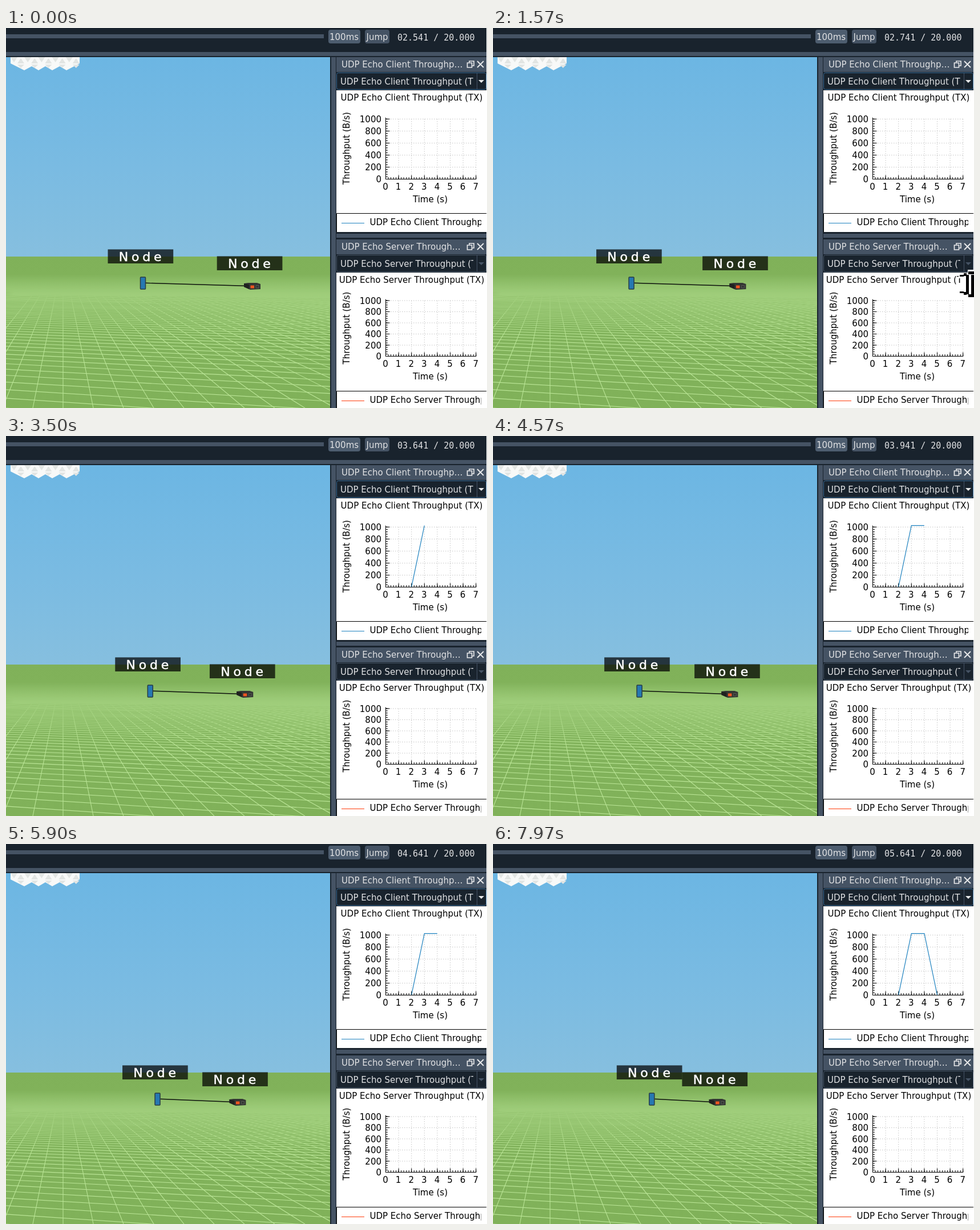
Recreate the animation shown at these times as an HTML page. Size 843 by 665 pixels, loop 8000 ms.

```html
<!DOCTYPE html>
<html lang="en">
<head>
<meta charset="utf-8">
<title>Network simulation playback</title>
<style>
  html, body { margin: 0; width: 100%; height: 100%; overflow: hidden; background: #19232d; }
  svg { display: block; }
  text { font: 15px "DejaVu Sans", sans-serif; white-space: pre; }
  .ui { fill: #e0e1e3; }
  .clock { font-family: "DejaVu Sans Mono", monospace; }
  .label { font-size: 22px; letter-spacing: 5.8px; fill: #fff; stroke: #fff; stroke-width: .5px; }
  .mid { text-anchor: middle; }
  .end { text-anchor: end; }
  rect { shape-rendering: crispEdges; }
  .round { shape-rendering: auto; }
</style>
</head>
<body>
<svg id="stage" width="843" height="665" viewBox="0 0 843 665"></svg>
<script>
const LOOP = 8000;
const BAR = '#455364', DARK = '#19232d';

const rect = (x, y, w, h, fill, extra = '') =>
  `<rect x="${x}" y="${y}" width="${w}" height="${h}" fill="${fill}" ${extra}/>`;
const text = (x, y, str, cls = '', extra = '') =>
  `<text x="${x}" y="${y}" class="${cls}" ${extra}>${str}</text>`;
const path = (d, stroke, width = 1, extra = '') =>
  `<path d="${d}" fill="none" stroke="${stroke}" stroke-width="${width}" ${extra}/>`;
const range = (from, to) => Array.from({ length: to - from + 1 }, (_, i) => from + i);

function ground() {
  const vx = 100, horizon = 400, depth = 265, farX = 3700;
  const rays = range(-4, 130).map(k => `M${vx} ${horizon}L${vx + k * 53} ${horizon + depth}`).join('');
  const rows = range(-10, 110).map(n => {
    const drop = 1 / (1 / depth + n * 0.00026);
    return `M0 ${(horizon + drop).toFixed(2)}L568 ${(horizon + drop * (1 + 568 / farX)).toFixed(2)}`;
  }).join('');
  return rect(0, 400, 568, 265, 'url(#grass)') +
    `<g mask="url(#fade)">${path(rays, '#b9e495', 1.1)}${path(rows, '#b9e495', 1.1)}</g>`;
}

function cloud() {
  const outline = 'M8 51V62L32 74L45 67L57 74L69 67L81 74L94 67L106 74L129 62V51Z';
  const facets = range(0, 4).map(i => {
    const x = 8 + i * 24.2;
    return `M${x} 51h12l-6 9zM${x + 12} 62l6 -9l6 9zM${x + 12} 64h12l-6 6z`;
  }).join('');
  return `<path d="${outline}" fill="#f8f9f8"/><path d="${facets}" fill="#e2e5e3"/>`;
}

const label = (x, y) => rect(x, y, 114.7, 24.6, '#000', 'class="round" fill-opacity=".72"') +
  text(x + 19.3, y + 20.6, 'Node', 'label');

function scene() {
  return `<g clip-path="url(#view)">
    ${rect(0, 51, 568, 350, 'url(#sky)')}${ground()}${cloud()}
    <path id="wire" stroke="#0c100c" stroke-width="1.4"/>
    <g id="left">
      <rect class="round" x="235.5" y="436" width="9" height="21" rx="1" fill="#2678b2" stroke="#283c46" stroke-width="1.5"/>
      ${label(178.5, 387.4)}
    </g>
    <g id="right">
      <path d="M417 447L424 446H440L446 448V457L428 458L417 453Z" fill="#333633"/>
      <path d="M417 447L426 449V457L417 453Z" fill="#1f211f"/>
      ${rect(428.5, 450.5, 6.5, 5, '#ee5520', 'class="round"')}
      ${path('M438 450.5h5v4.5h-5z', '#555854')}
      ${label(369.7, 399.4)}
    </g>
  </g>`;
}

function toolbar() {
  return rect(0, 11, 557, 7, BAR) +
    rect(565, 3, 56, 24, '#4d5d6f', 'rx="4" class="round"') + text(567, 21, '100ms', 'ui') +
    rect(629, 3, 43, 24, BAR, 'rx="4" class="round"') + text(631.5, 21, 'Jump', 'ui') +
    text(686, 22, '', 'ui clock', 'id="clock"') +
    rect(0, 42, 843, 7, BAR) + rect(570, 51, 8, 614, BAR) + rect(579, 360, 264, 7, BAR);
}

// Dock header: title strip, two small icons and a drop-down.
function header(top, title, choice, active) {
  const icons = `M812 ${top + 9}V${top + 7}H820V${top + 15}H817M808.5 ${top + 10}H816.5V${top + 18}H808.5Z`;
  const cross = `M826 ${top + 7}L837 ${top + 18}M837 ${top + 7}L826 ${top + 18}`;
  return rect(579, top, 263, 26, BAR) + text(588, top + 18, title, 'ui') +
    path(icons, '#e8e9ea', 1.7) + path(cross, '#e8e9ea', 1.9) +
    `<rect class="round" x="579.5" y="${top + 27.5}" width="262" height="29" rx="3" fill="${DARK}" stroke="${active ? '#346792' : BAR}"/>` +
    text(586, top + 47.5, choice, 'ui', 'clip-path="url(#combo)"') +
    path(`M825.5 ${top + 28}v28`, BAR) +
    `<path d="M828 ${top + 40}h10l-5 5z" fill="${active ? '#e8e9ea' : '#455364'}"/>`;
}

function chart(o) {
  const px = t => 665.5 + t * 22.6, py = v => o.zero - v * o.scale;
  const top = py(1024), steps = range(0, 5).map(i => i * 200), secs = range(0, 7);
  const grid = steps.slice(1).map(v => `M666 ${py(v)}H824`).join('') +
    secs.slice(1).map(t => `M${px(t)} ${o.zero}V${top}`).join('');
  const ticks = steps.map(v => `M665.5 ${py(v)}h7`).join('') +
    range(0, 25).map(i => `M665.5 ${py(i * 40)}h3.5`).join('') +
    secs.map(t => `M${px(t)} ${o.zero}v-7`).join('') +
    range(0, 35).map(i => `M${px(i / 5)} ${o.zero}v-3.5`).join('');
  const midY = o.nameY;
  return rect(579, o.top, 263, o.bottom - o.top, '#fff') +
    text(711, o.top + 18, o.title, 'mid') +
    path(grid, '#c4c4c4', 1, 'stroke-dasharray="1.5 2.5"') +
    path(`M665.5 ${top}V${o.zero}H824` + ticks, '#000') +
    steps.map(v => text(658, py(v) + 5.5, v, 'end')).join('') +
    secs.map(t => text(px(t) - 0.5, o.zero + 18.5, t, 'mid')).join('') +
    text(743.5, o.zero + 40.5, 'Time (s)', 'mid') +
    text(602, midY, 'Throughput (B/s)', 'mid', `transform="rotate(-90 602 ${midY})"`) +
    path(`M842 ${o.legend + 0.5}H579.5V${o.bottom}`, '#000') +
    path(`M588 ${o.legend + 17.5}H628`, o.color) +
    text(637.5, o.legend + 21, o.title, '', 'clip-path="url(#legend)"');
}

const cursor = `<g id="cursor" shape-rendering="crispEdges">
  <path d="M816 430H832V423H843V472H832V466H816V458H820V438H816Z" fill="#fff"/>
  <path d="M818 432h7v3h-7zM818 461h7v3h-7zM825 429h5v5h-5zM825 462h5v5h-5zM829 432h5v34h-5zM838 432h5v34h-5zM833 426h10v5h-10zM833 466h10v5h-10z" fill="#000"/>
</g>`;

const client = 'UDP Echo Client Throughput (TX)', server = 'UDP Echo Server Throughput (TX)';
const stage = document.getElementById('stage');
stage.innerHTML = `<defs>
  <linearGradient id="sky" x1="0" y1="0" x2="0" y2="1">
    <stop stop-color="#6cb6e3"/><stop offset=".55" stop-color="#7abbe2"/><stop offset="1" stop-color="#86bfdf"/>
  </linearGradient>
  <linearGradient id="grass" x1="0" y1="0" x2="0" y2="1">
    <stop stop-color="#80b159"/><stop offset=".12" stop-color="#81b25a"/>
    <stop offset=".22" stop-color="#88b963"/><stop offset=".5" stop-color="#82b35c"/><stop offset="1" stop-color="#80b159"/>
  </linearGradient>
  <linearGradient id="haze" gradientUnits="userSpaceOnUse" x1="0" y1="430" x2="0" y2="550">
    <stop stop-color="#000"/><stop offset=".3" stop-color="#777"/><stop offset="1" stop-color="#fff"/>
  </linearGradient>
  <mask id="fade" maskUnits="userSpaceOnUse" x="0" y="400" width="568" height="265">${rect(0, 400, 568, 265, 'url(#haze)')}</mask>
  <clipPath id="view">${rect(0, 51, 568, 614, '#fff')}</clipPath>
  <clipPath id="combo">${rect(580, 51, 239, 614, '#fff')}</clipPath>
  <clipPath id="legend">${rect(580, 51, 253, 614, '#fff')}</clipPath>
</defs>` +
  rect(0, 0, 843, 665, DARK) + toolbar() + scene() +
  header(51, 'UDP Echo Client Throughp…', client, true) +
  chart({ top: 109, bottom: 357, zero: 264.5, scale: 0.1052, nameY: 210.5, legend: 324, title: client, color: '#1f82bf' }) +
  header(370, 'UDP Echo Server Through…', server, false) +
  chart({ top: 428, bottom: 665, zero: 574.5, scale: 0.0975, nameY: 525, legend: 635, title: server, color: '#ff3c0a' }) +
  path('', '#1f82bf', 1.2, 'id="plot"') + rect(842, 0, 1, 665, '#fff') + cursor;

const [clock, wire, left, right, plot, pointer] =
  ['clock', 'wire', 'left', 'right', 'plot', 'cursor'].map(id => document.getElementById(id));

// Each entry is the moment the simulation advances by 0.1 s.
const advances = [1170, 1500, 1700, 1900, 2100, 2300, 2570, 2800, 3030, 3270, 3500, 3700, 4100,
  4570, 4640, 4900, 5100, 5300, 5500, 5700, 5900, 6100, 6300, 6500, 6700,
  6970, 7170, 7370, 7570, 7770, 7970];
// Plot points: advance count at which they appear, then position.
const samples = [[4, 710.7, 264], [4, 733.3, 156.7], [14, 755.9, 156.7], [24, 778.5, 264]];

function render(t) {
  const step = advances.filter(at => at <= t).length;
  const shift = (step < 3 ? step : step - 1) * 1.277;
  clock.textContent = `0${(2.541 + step / 10).toFixed(3)} / 20.000`;
  left.setAttribute('transform', `translate(${shift} 0)`);
  right.setAttribute('transform', `translate(${-shift} 0)`);
  wire.setAttribute('d', `M${245 + shift} 446.3L${418 - shift} 451.3`);
  const shown = samples.filter(([from]) => step >= from).map(([, x, y]) => `${x} ${y}`);
  plot.setAttribute('d', shown.length ? 'M' + shown.join('L') : '');
  pointer.style.display = t >= 1500 && t < 1700 ? '' : 'none';
}

const start = performance.now();
function tick() {
  render((performance.now() - start) % LOOP);
  requestAnimationFrame(tick);
}
tick();
</script>
</body>
</html>
```
